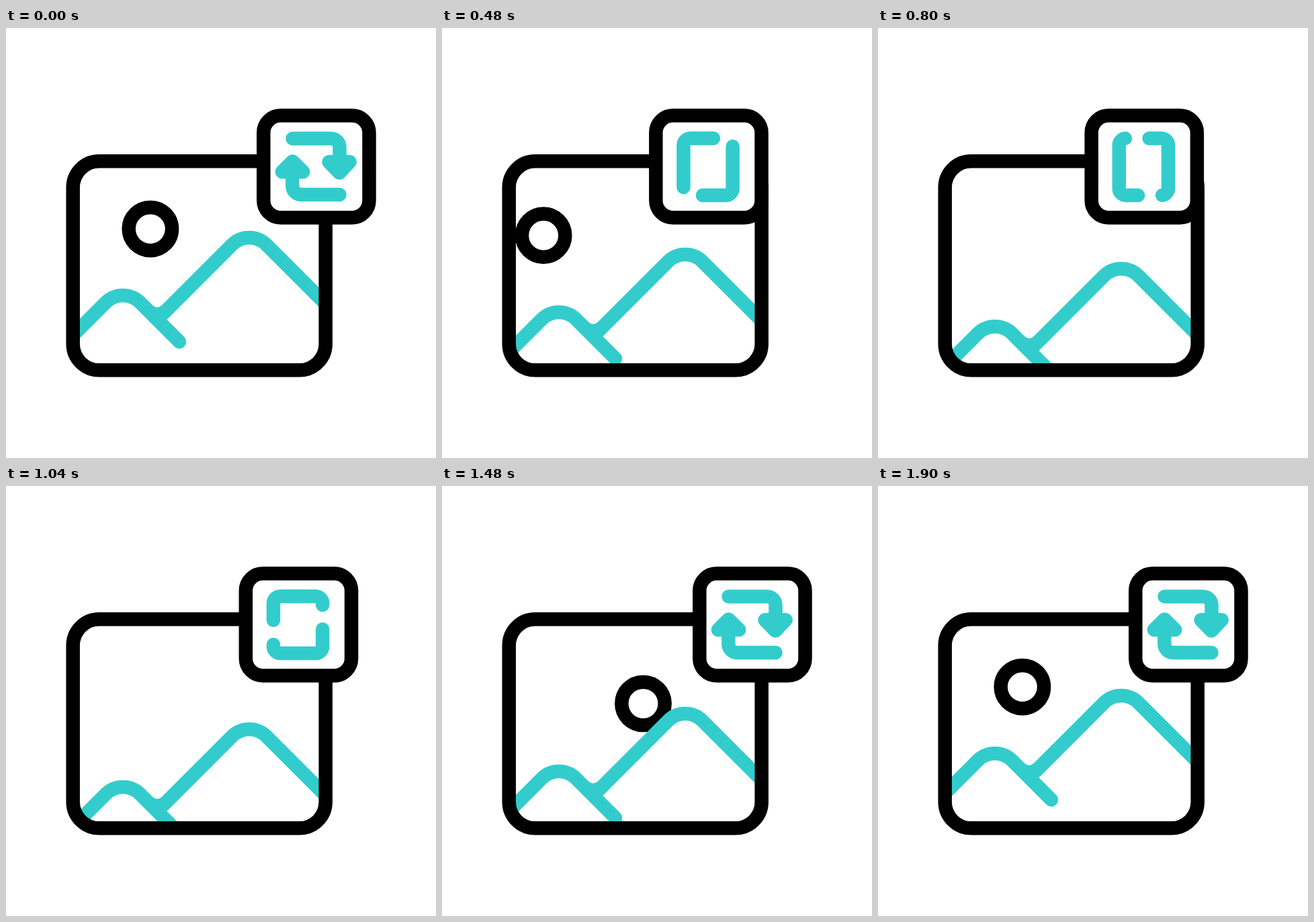
These frames come from a looping animation (640x640 px, 3 s). An HTML page:

```html
<!DOCTYPE html>
<html lang="en">
<head>
<meta charset="utf-8">
<title>Image swap icon</title>
<style>
  html, body { margin: 0; width: 100%; height: 100%; overflow: hidden; background: #fff; }
  svg { display: block; width: 100vw; height: 100vh; }
  .line { fill: none; stroke: #000; stroke-width: 20.5; }
  .teal { stroke: #33cccc; stroke-linecap: round; stroke-linejoin: round; }
  .white { fill: #fff; }
  .head { fill: #33cccc; transform-box: fill-box; transform-origin: center; }
</style>
</head>
<body>
<svg viewBox="0 0 640 640">
  <clipPath id="inside"><rect x="99.7" y="198.3" width="376" height="311" rx="39"/></clipPath>

  <g clip-path="url(#inside)">
    <circle id="sun" class="line" r="32.2"/>
    <g id="hills">
      <path class="white" d="M225 434L336.5 322.5A36 36 0 0 1 387.5 322.5L505 440V640H225Z"/>
      <path class="white" d="M70 487L148.5 408.5A36 36 0 0 1 199.5 408.5L225 434V640H70Z"/>
      <path class="line teal" d="M227 432L336.5 322.5A36 36 0 0 1 387.5 322.5L505 440"/>
      <path class="line teal" d="M70 487L148.5 408.5A36 36 0 0 1 199.5 408.5L258 467"/>
      <path fill="#33cccc" d="M218 412.5Q225 419 232 412.5L225 422Z"/>
    </g>
  </g>
  <rect class="line" x="99.7" y="198.3" width="376" height="311" rx="39"/>

  <g id="badge">
    <rect class="line white" style="fill:#fff" x="383.3" y="130.3" width="157.2" height="152" rx="25.5"/>
    <rect id="loop" class="line teal" x="424.4" y="164.3" width="73.2" height="84.7" rx="10.25"/>
    <g id="shafts">
      <path class="line teal" d="M426.5 164.5H483.5A13 13 0 0 1 496.5 177.5V200"/>
      <path class="line teal" d="M496.5 248H439.3A13 13 0 0 1 426.3 235V212"/>
    </g>
    <path class="line teal head" style="fill:#33cccc" d="M480.5 199.3H511.7L496.2 215.6Z"/>
    <path class="line teal head" style="fill:#33cccc" d="M410.8 214H442.3L426.4 198.4Z"/>
  </g>
</svg>
<script>
  const LOOP = 3000, STEP = 20;
  const byId = id => document.getElementById(id);
  const [sun, hills, badge, loop, shafts] = ['sun', 'hills', 'badge', 'loop', 'shafts'].map(byId);
  const heads = document.querySelectorAll('.head');

  // Half of the rounded loop's length holds one dash and one gap.
  const half = 73.2 + 84.7 - 4 * 10.25 + Math.PI * 10.25;
  loop.setAttribute('stroke-dasharray', `113 ${half - 113}`);

  const ease = s => s * s * (3 - 2 * s);

  // Eased value at time t through [time, value] keys.
  function track(keys, t) {
    if (t <= keys[0][0]) return keys[0][1];
    for (let i = 1; i < keys.length; i++) {
      const [t0, v0] = keys[i - 1], [t1, v1] = keys[i];
      if (t < t1) return v0 + (v1 - v0) * ease((t - t0) / (t1 - t0));
    }
    return keys[keys.length - 1][1];
  }

  const badgeX = [[0, 0], [640, -77], [1300, 0]];
  const hillsY = [[0, 0], [960, 50], [1100, 50], [1900, 0]];
  const dashTurn = [[65, 0], [1295, 1]];
  const headSize = [[0, 1], [120, 0], [1180, 0], [1300, 1]];
  // Degrees from the top of the sun's arc: out on the left, back in from the right.
  const sunOut = [[0, 1.9], [180, 4.4], [960, -66.8]];
  const sunIn = [[1100, 71.3], [1800, -0.6], [1900, 1.9]];

  function draw(t) {
    const angle = track(t < 1030 ? sunOut : sunIn, t) * Math.PI / 180;
    sun.setAttribute('cx', 209 + 177 * Math.sin(angle));
    sun.setAttribute('cy', 476 - 177 * Math.cos(angle));
    hills.setAttribute('transform', `translate(0 ${track(hillsY, t)})`);
    badge.setAttribute('transform', `translate(${track(badgeX, t)} 0)`);

    const resting = t < STEP || t >= 1300;
    shafts.style.display = resting ? '' : 'none';
    loop.style.display = resting ? 'none' : '';
    loop.setAttribute('stroke-dashoffset', 8.6 - 2 * half * track(dashTurn, t));

    const size = track(headSize, t);
    for (const head of heads) {
      head.style.display = size > 0 ? '' : 'none';
      head.style.transform = `scale(${size})`;
    }
  }

  const start = performance.now();
  function tick() {
    const t = (performance.now() - start) % LOOP;
    draw(Math.floor(t / STEP) * STEP);
    requestAnimationFrame(tick);
  }
  tick();
</script>
</body>
</html>
```
